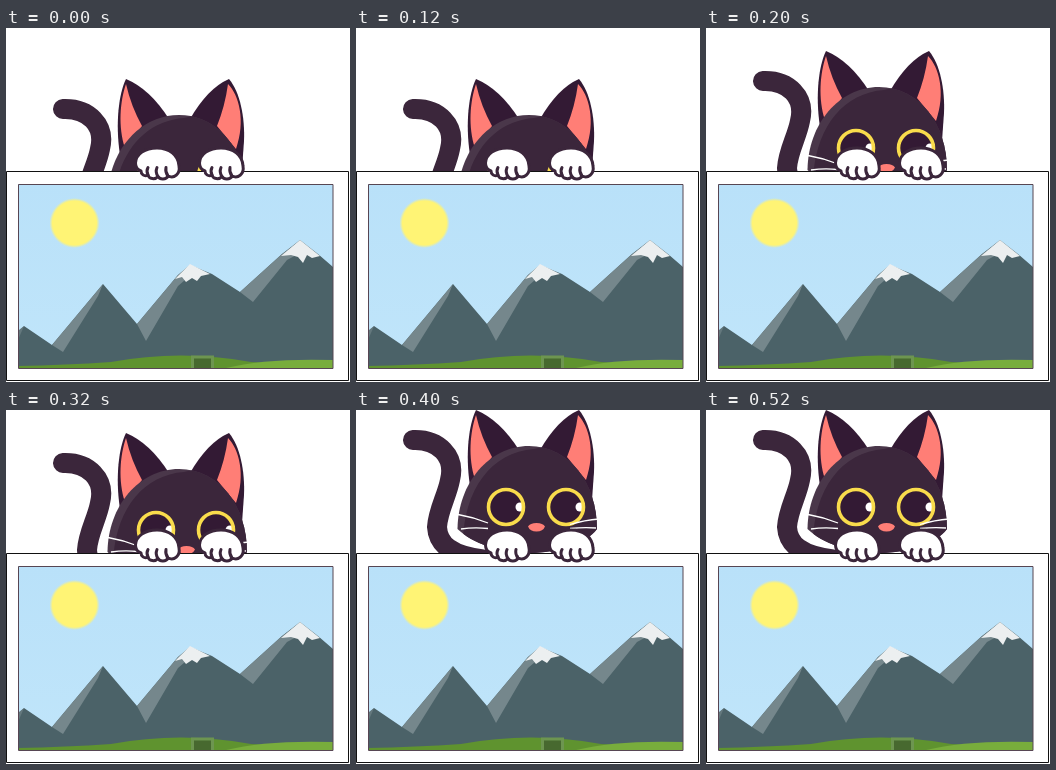
These frames come from a looping animation (344 px wide and 354 px high, 0.6 s). An HTML page:

```html
<!DOCTYPE html>
<html lang="en">
<head>
<meta charset="utf-8">
<title>Peeking cat</title>
<style>
  html, body { margin: 0; width: 100%; height: 100%; overflow: hidden; background: #fff; }
  svg { display: block; width: 100vw; height: 100vh; }
</style>
</head>
<body>
<svg viewBox="0 0 344 354">
  <defs>
    <clipPath id="above"><rect width="344" height="143.5"/></clipPath>
    <clipPath id="view"><rect x="12" y="156" width="315" height="184"/></clipPath>
    <clipPath id="face"><use href="#head"/></clipPath>
    <linearGradient id="sky" x2="0" y2="1">
      <stop stop-color="#b9e1f9"/><stop offset="1" stop-color="#c0e5fa"/>
    </linearGradient>
    <radialGradient id="sun">
      <stop offset=".88" stop-color="#fff475"/><stop offset="1" stop-color="#fff475" stop-opacity="0"/>
    </radialGradient>
    <path id="head" d="M173 36C133 36 102 73 101.500 119C116 133 143 143 173 143C202 143 230 134 241 119C241 73 213 36 173 36Z"/>
    <g id="eye">
      <circle r="17.500" fill="#331a34"/>
      <circle cx="14" r="4.500" fill="#fff"/>
      <circle r="17.500" fill="none" stroke="#f9dc4c" stroke-width="3.600"/>
    </g>
    <g id="paw" stroke="#3b263b" stroke-width="3" stroke-linecap="round" stroke-linejoin="round">
      <path fill="#fff" d="M129.500 135C130 126 139 120 151 120C163 120 172.500 127 173 138C174.500 146 168 151 162 148C160 152 154 152 152 148.500C149 152 143 151 142 147C138 149 135 146 135 143C132 142 129.500 139 129.500 135Z"/>
      <path fill="none" d="M142 147Q140 143 142 139.500M152 148.500Q149 144 151 139.500M162 148Q159 144 160 139.500"/>
    </g>
  </defs>

  <g clip-path="url(#above)">
    <g id="cat">
      <path fill="none" stroke="#3b263b" stroke-width="20" stroke-linecap="round"
        d="M57 30C82 29 100 46 94 70C91 86 82 100 81 117C82 134 94 146 130 150"/>
      <g fill="#331a34">
        <path d="M120 0C113 14 109 44 114 76L163 40Q144 10 120 0Z"/>
        <path d="M223 0C234 13 239 38 238 62L236 90L184 40Q202 9 223 0Z"/>
      </g>
      <g fill="#ff7e76">
        <path d="M120 5C114 22 112 48 119 69L136 47Q125 27 120 5Z"/>
        <path d="M222 5C233 16 240 42 230 70L211 47Q219 27 222 5Z"/>
      </g>
      <use href="#head" fill="#4a374a"/>
      <g clip-path="url(#face)">
        <path fill="#3b263b" d="M107 132C108 80 135 42 178 39L215 30L250 80V150H107Z"/>
      </g>
      <use href="#eye" x="150" y="97"/>
      <use href="#eye" x="210" y="97"/>
      <path fill="#ff7e76" d="M172 116.500Q174 113 180.500 113Q187 113 189 116.500Q187 121.500 180.500 121.500Q174 121.500 172 116.500Z"/>
      <path fill="none" stroke="#fff" stroke-width="1.300"
        d="M102 104.500Q117 107 132 113M105 119Q118 117 132 118.500M243 109Q229 110 214 114.500M240 118Q228 117 214 118.500"/>
    </g>
  </g>

  <path fill="#fff" stroke="#111" d="M.5 143.500H342.500V352.500H.5Z"/>
  <g clip-path="url(#view)">
    <rect x="12" y="156" width="315" height="184" fill="url(#sky)"/>
    <circle cx="68.500" cy="195" r="25" fill="url(#sun)"/>
    <path fill="#4b6268" d="M12 303L18 298L46 317L97 256L131 296L172 247L184 237L206 246L234 264L276 226L294 212L312 226L327 239V340H12Z"/>
    <g fill="#75878c">
      <path d="M184 237L172 247L131 296L140 313L172 258L186 246Z"/>
      <path d="M294 213L276 226L234 264L247 274L281 232L296 224Z"/>
      <path d="M97 256L46 317L57 324L92 268Z"/>
      <path d="M18 298L12 303V312Z" opacity=".6"/>
    </g>
    <g fill="#eceff0">
      <path d="M184 236L169 251L176 249L180 254L186 250L191 253L195 248L204 246Z"/>
      <path d="M294 212L275 228L285 227L292 229L297 235L301 227L306 230L314 228Z"/>
    </g>
    <path fill="#5f932f" d="M12 338Q60 337 105 334Q175 321 245 334L327 338V340H12Z"/>
    <path fill="#78ad3c" d="M220 340Q260 330 327 332V340Z"/>
    <path fill="#47692f" stroke="#6d9550" stroke-width="3" d="M186.500 342V329H206.500V342"/>
  </g>
  <path fill="none" stroke="#574653" d="M12.500 156.500H327V340.500H12.500Z"/>

  <use href="#paw"/>
  <use href="#paw" x="64"/>
</svg>
<script>
  const cat = document.getElementById("cat");
  const drops = [51, 23, 0];
  const stepMs = 200;

  function draw(ms) {
    const step = Math.floor(ms / stepMs) % drops.length;
    cat.setAttribute("transform", `translate(0 ${drops[step]})`);
  }

  const start = performance.now();
  function tick() {
    draw(performance.now() - start);
    requestAnimationFrame(tick);
  }
  tick();
</script>
</body>
</html>
```
